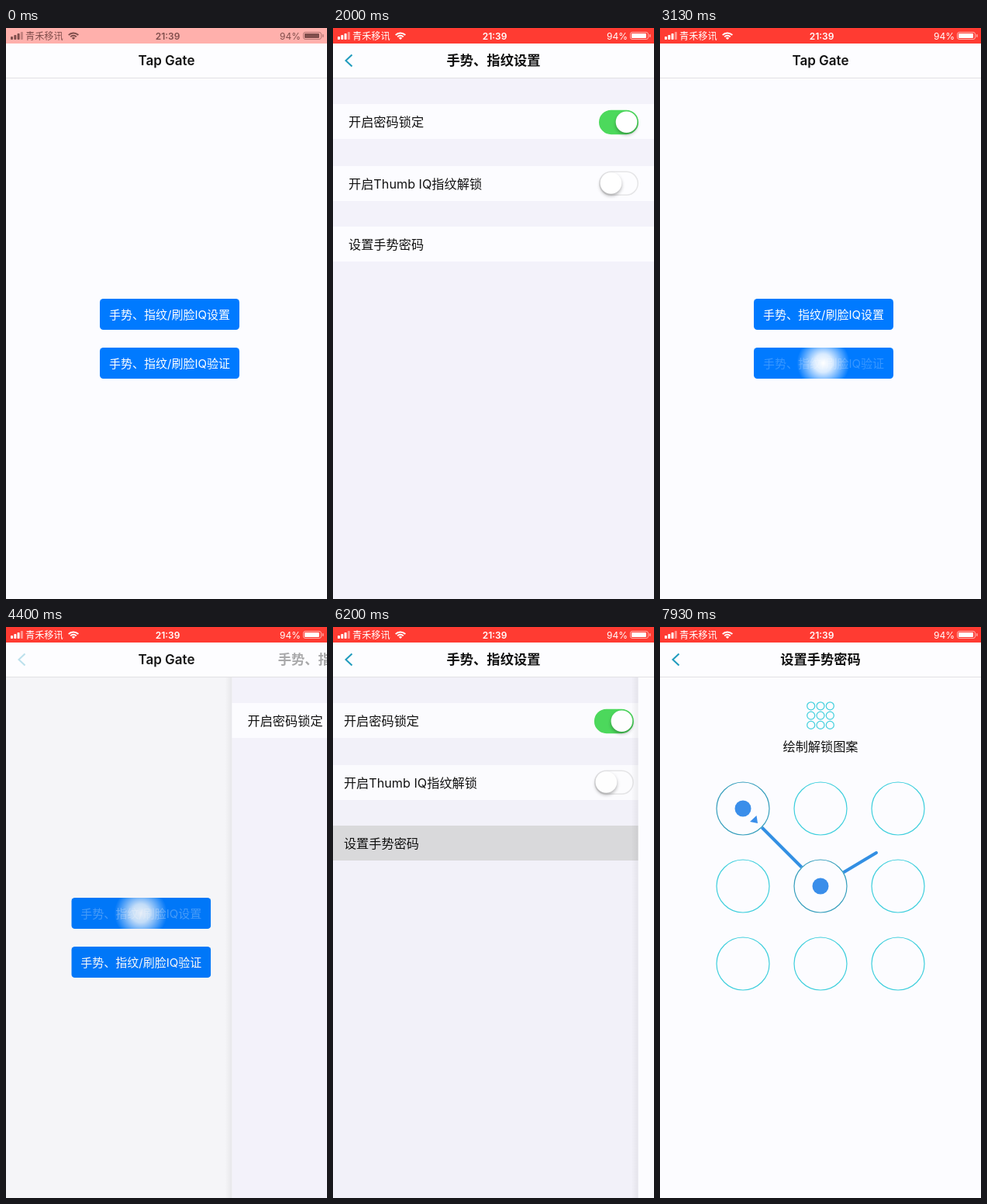
An HTML page with a canvas that plays this animation: 414 px wide and 736 px high, repeating every 8 s.

```html
<!DOCTYPE html>
<html lang="zh-CN">
<head>
<meta charset="utf-8">
<title>Tap Gate</title>
<style>
html, body { margin: 0; width: 100%; height: 100%; overflow: hidden; background: #fcfcff; }
canvas { display: block; width: 414px; height: 736px; }
</style>
</head>
<body>
<canvas id="stage"></canvas>
<script>
const W = 414, H = 736, LOOP = 8000;
const canvas = document.getElementById('stage');
const ratio = window.devicePixelRatio || 1;
canvas.width = W * ratio;
canvas.height = H * ratio;
const ctx = canvas.getContext('2d');

const FONT = 'Inter, "Noto Sans CJK SC", "Noto Sans CJK", sans-serif';
const PAPER = '#fcfcff', INK = '#111', BLUE = '#007aff', TEAL = '#1f9bbd', CYAN = '#3fcfdd';
const TITLES = { main: 'Tap Gate', settings: '手势、指纹设置', pattern: '设置手势密码' };

const clamp = (v, a = 0, b = 1) => Math.min(b, Math.max(a, v));
const lerp = (a, b, k) => a + (b - a) * k;
const mix = (a, b, k) => `rgb(${a.map((v, i) => Math.round(lerp(v, b[i], k))).join()})`;

// Critically damped spring of the navigation slide
function spring(ms) {
  const x = Math.max(0, ms) * 0.0153;
  return 1 - (1 + x) * Math.exp(-x);
}

function layer(alpha, draw) {
  ctx.save();
  ctx.globalAlpha *= clamp(alpha);
  draw();
  ctx.restore();
}

function text(str, x, y, size, color, align = 'left', weight = 400) {
  ctx.font = `${weight} ${size}px ${FONT}`;
  ctx.textAlign = align;
  ctx.fillStyle = color;
  ctx.fillText(str, x, y);
}

function rect(x, y, w, h, color) {
  ctx.fillStyle = color;
  ctx.fillRect(x, y, w, h);
}

function roundPath(x, y, w, h, r) {
  ctx.beginPath();
  ctx.roundRect(x, y, w, h, r);
}

function roundRect(x, y, w, h, r, color) {
  roundPath(x, y, w, h, r);
  ctx.fillStyle = color;
  ctx.fill();
}

function disc(x, y, r, color) {
  ctx.beginPath();
  ctx.arc(x, y, r, 0, Math.PI * 2);
  ctx.fillStyle = color;
  ctx.fill();
}

function ring(x, y, r, color, width) {
  ctx.beginPath();
  ctx.arc(x, y, r, 0, Math.PI * 2);
  ctx.strokeStyle = color;
  ctx.lineWidth = width;
  ctx.stroke();
}

function statusBar(t) {
  const k = clamp((t - 40) / 290);
  const fg = mix([128, 78, 76], [255, 255, 255], k);
  rect(0, 0, W, 20, mix([255, 176, 172], [255, 59, 50], k));
  for (let i = 0; i < 4; i++) {
    layer(i < 3 ? 1 : 0.45, () => roundRect(6 + i * 4.3, 11 - i * 2, 3, 4 + i * 2, 0.8, fg));
  }
  text('青禾移讯', 25, 15, 12.2, fg);
  ctx.strokeStyle = fg;
  ctx.lineWidth = 2;
  for (const r of [5.2, 8.6]) {
    ctx.beginPath();
    ctx.arc(87, 15, r, -Math.PI * 0.76, -Math.PI * 0.24);
    ctx.stroke();
  }
  ctx.beginPath();
  ctx.moveTo(87, 15);
  ctx.arc(87, 15, 3, -Math.PI * 0.76, -Math.PI * 0.24);
  ctx.fillStyle = fg;
  ctx.fill();
  text('21:39', 208.5, 15, 12, fg, 'center', 600);
  text('94%', 380, 15, 12, fg, 'right');
  layer(0.6, () => {
    roundPath(383.5, 5.5, 23, 9, 2.5);
    ctx.strokeStyle = fg;
    ctx.lineWidth = 1;
    ctx.stroke();
    roundRect(408, 8, 1.5, 4, 0.7, fg);
  });
  roundRect(385, 7, 19, 6, 1, fg);
}

function navBar(from, to, p, back) {
  rect(0, 20, W, 44, '#fdfdff');
  rect(0, 64, W, 1, '#e2e1e4');
  const title = (name, x) => text(TITLES[name], x, 48, name === 'main' ? 17 : 17.3, INK, 'center', 600);
  if (p < 1) layer((1 - p) * 1.4, () => title(from, 207));
  if (p > 0) layer(p * 1.2, () => title(to, 207 + (1 - p) * 290));
  layer(back, () => {
    ctx.beginPath();
    ctx.moveTo(24.5, 34.5);
    ctx.lineTo(16.5, 42);
    ctx.lineTo(24.5, 49.5);
    ctx.strokeStyle = TEAL;
    ctx.lineWidth = 2;
    ctx.stroke();
  });
}

function button(label, y, glow) {
  ctx.save();
  roundPath(121, y, 180, 40, 4.5);
  ctx.clip();
  rect(121, y, 180, 40, BLUE);
  layer(1 - 0.78 * glow, () => text(label, 211, y + 25.5, 15, '#fff', 'center'));
  if (glow > 0) {
    const g = ctx.createRadialGradient(210.5, y + 20, 0, 210.5, y + 20, 34);
    g.addColorStop(0, '#fff');
    g.addColorStop(0.35, 'rgba(255,255,255,.85)');
    g.addColorStop(1, 'rgba(255,255,255,0)');
    layer(glow, () => rect(170, y, 82, 40, g));
  }
  ctx.restore();
}

// Touch highlight: instant on, short hold, fade out
function highlight(t, start) {
  return t < start ? 0 : 1 - clamp((t - start - 100) / 400);
}

function mainPage(t) {
  rect(0, 64, W, H - 64, PAPER);
  button('手势、指纹/刷脸IQ设置', 349, t < 4000 ? highlight(t, 870) : highlight(t, 4270));
  button('手势、指纹/刷脸IQ验证', 412, highlight(t, 3130));
}

function toggle(y, on) {
  roundPath(343.75, y - 14.75, 49.5, 30, 15);
  ctx.fillStyle = mix([253, 253, 255], [76, 217, 92], on);
  ctx.fill();
  ctx.strokeStyle = mix([229, 229, 231], [76, 217, 92], on);
  ctx.lineWidth = 1.5;
  ctx.stroke();
  ctx.save();
  ctx.shadowColor = 'rgba(0,0,0,.3)';
  ctx.shadowBlur = 4 * ratio;
  ctx.shadowOffsetY = 2.5 * ratio;
  disc(lerp(358.5, 378.5, on), y, 13.8, '#fff');
  ctx.restore();
}

function row(y, label, pressed) {
  rect(0, y, W, 45, pressed ? '#dadadc' : PAPER);
  text(label, 20, y + 28.7, 16.2, INK);
}

function settingsPage(on, pressed) {
  rect(0, 64, W, H - 64, '#f3f2fa');
  row(98, '开启密码锁定');
  toggle(121.2, on);
  layer(on, () => {
    row(178, '开启Thumb IQ指纹解锁');
    toggle(200, 0);
    row(256, '设置手势密码', pressed);
  });
}

const node = (i) => ({ x: 107 + (i % 3) * 100, y: 234 + Math.floor(i / 3) * 100 });

function pattern(t) {
  const a = node(0), b = node(4);
  const turn = 7795;
  const k = clamp((t - 7480) / (turn - 7480));
  const j = clamp((t - turn) / (7930 - turn));
  const tip = t < turn
    ? { x: lerp(a.x, b.x, k), y: lerp(a.y, b.y, k) }
    : { x: lerp(b.x, 279, j), y: lerp(b.y, 291, j) };
  const reached = t >= turn || Math.hypot(b.x - tip.x, b.y - tip.y) < 34;
  const hit = t < 7470 ? [] : reached ? [0, 4] : [0];

  if (hit.length) {
    ctx.save();
    ctx.beginPath();
    ctx.rect(0, 64, W, H - 64);
    for (const i of hit) {
      const n = node(i);
      ctx.moveTo(n.x + 34.5, n.y);
      ctx.arc(n.x, n.y, 34.5, 0, Math.PI * 2);
    }
    ctx.clip('evenodd');
    ctx.beginPath();
    for (const i of hit) ctx.lineTo(node(i).x, node(i).y);
    ctx.lineTo(tip.x, tip.y);
    ctx.strokeStyle = '#338fe3';
    ctx.lineWidth = 4;
    ctx.lineCap = ctx.lineJoin = 'round';
    ctx.stroke();
    ctx.restore();
  }

  for (let i = 0; i < 9; i++) {
    const n = node(i), lit = hit.includes(i);
    ring(n.x, n.y, 34, lit ? '#379fbd' : CYAN, 1.2);
    if (lit) disc(n.x, n.y, 10.5, '#3a8eea');
  }
  if (hit.length > 1) {
    ctx.beginPath();
    ctx.moveTo(116, 251);
    ctx.lineTo(124.5, 243);
    ctx.lineTo(126, 253);
    ctx.fillStyle = '#3a8eea';
    ctx.fill();
  }
}

function patternPage(t) {
  rect(0, 64, W, H - 64, PAPER);
  for (let i = 0; i < 9; i++) {
    ring(194.7 + (i % 3) * 12.3, 101.8 + Math.floor(i / 3) * 12.3, 5, CYAN, 1.2);
  }
  text('绘制解锁图案', 207, 160, 16.2, INK, 'center');
  pattern(t);
}

function shifted(x, draw) {
  ctx.save();
  ctx.translate(x, 0);
  draw();
  ctx.restore();
}

// The lower page drifts left and darkens while the upper one covers it
function slide(p, under, over) {
  if (p < 1) {
    shifted(-124 * p, under);
    rect(0, 64, W, H - 64, `rgba(0,0,0,${0.095 * p})`);
  }
  if (p > 0) {
    shifted(W * (1 - p), () => {
      const edge = ctx.createLinearGradient(-9, 0, 0, 0);
      edge.addColorStop(0, 'rgba(0,0,0,0)');
      edge.addColorStop(1, 'rgba(0,0,0,.06)');
      rect(-9, 64, 9, H - 64, edge);
      over();
    });
  }
}

const settle = (p) => p > 0.9985 ? 1 : p < 0.0015 ? 0 : p;

function render(t) {
  ctx.setTransform(ratio, 0, 0, ratio, 0, 0);
  rect(0, 0, W, H, PAPER);
  const open = settle(t < 2285 ? spring(t - 930) : t < 4200 ? 1 - spring(t - 2285) : spring(t - 4330));
  const deep = settle(spring(t - 6178));
  const on = clamp(((t < 4200 ? t : t - 3335) - 1695) / 95);

  if (deep > 0) {
    slide(deep, () => settingsPage(1, true), () => patternPage(t));
    navBar('settings', 'pattern', deep, 1);
  } else {
    slide(open, () => mainPage(t), () => settingsPage(on, t >= 6070));
    navBar('main', 'settings', open, open);
  }
  statusBar(t);
}

const began = performance.now();
function tick() {
  render((performance.now() - began) % LOOP);
  requestAnimationFrame(tick);
}
tick();
</script>
</body>
</html>
```
